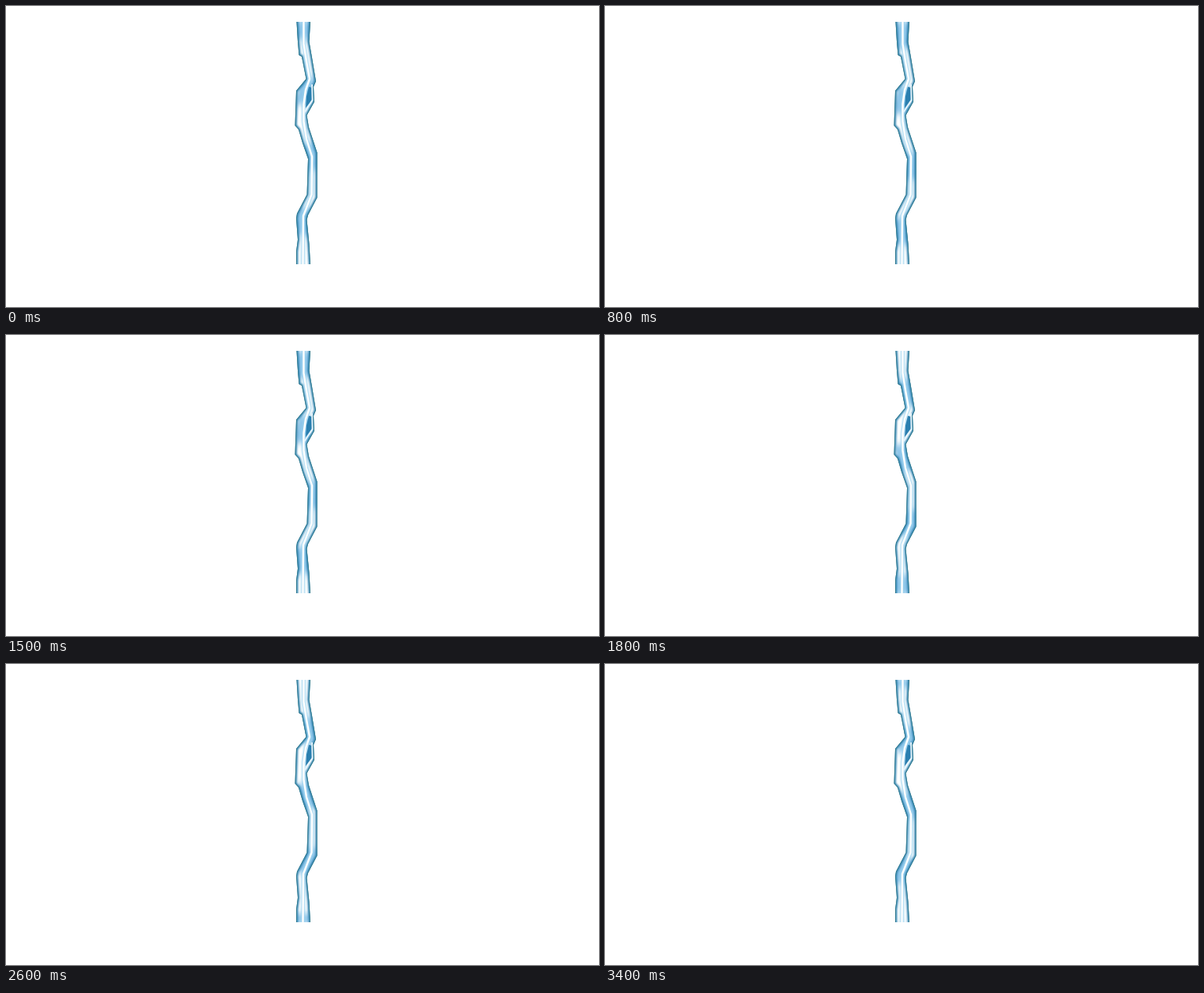
Write an HTML page that moves like this. It is 748 px wide and 380 px high and loops after 3.5 s.

```html
<!DOCTYPE html>
<html lang="en">
<head>
<meta charset="utf-8">
<title>Energy bolt</title>
<style>
  html, body { margin: 0; width: 100%; height: 100%; overflow: hidden; background: #fff; }
  svg { display: block; width: 748px; height: 380px; }
  path { fill: none; stroke-linejoin: round; }
  .body { fill: #46a8da; }
  .shade { stroke: #2b7fae; stroke-width: 4.5; }
  .rim { stroke: #3a7f8c; stroke-width: 1.6; }
  .flow {
    stroke: #2e95d8;
    stroke-width: 17;
    stroke-dasharray: 34 50;
    opacity: .55;
    animation: flow 700ms steps(7) infinite;
  }
  .halo { stroke: #9bd2ee; stroke-width: 4.6; }
  .core { stroke: #fff; stroke-width: 2.4; }
  .gap { fill: #2a7fb0; }
  .branch { stroke: #e6f5fc; stroke-width: 1.8; }
  /* one dash period downstream per cycle */
  @keyframes flow { from { stroke-dashoffset: 10; } to { stroke-dashoffset: -74; } }
</style>
</head>
<body>
<svg viewBox="0 0 748 380">
  <defs>
    <path id="shape" d="M366.5 20L368 45 369.5 62 373 64 378.5 92 366 107 364.5 151 369 156 374 173 381 193 379.5 238 367 262 366 268 368 295 366 310V326H384L382.5 300 379.5 270 381 264 392.5 242V185L382 153 379.5 138 389 121 388 102 391 95 386 65 382.5 45 384 20Z"/>
    <path id="sides" d="M366.5 18V20L368 45 369.5 62 373 64 378.5 92 366 107 364.5 151 369 156 374 173 381 193 379.5 238 367 262 366 268 368 295 366 310V328M384 328V326L382.5 300 379.5 270 381 264 392.5 242V185L382 153 379.5 138 389 121 388 102 391 95 386 65 382.5 45 384 18"/>
    <path id="spine" d="M375.5 18V48L379 70 383 92 378 106 375.5 124V146L379 168 386 190 385.5 238 375 265 374.5 328"/>
    <clipPath id="inside"><use href="#shape"/></clipPath>
    <filter id="soft" filterUnits="userSpaceOnUse" x="340" y="0" width="80" height="350">
      <feGaussianBlur stdDeviation="1 4"/>
    </filter>
    <filter id="fine" filterUnits="userSpaceOnUse" x="340" y="0" width="80" height="350">
      <feGaussianBlur stdDeviation=".8"/>
    </filter>
  </defs>
  <g clip-path="url(#inside)">
    <use href="#shape" class="body"/>
    <g filter="url(#soft)"><use href="#spine" class="flow"/></g>
    <use href="#sides" class="shade" filter="url(#fine)"/>
    <use href="#spine" class="halo" filter="url(#fine)"/>
    <path class="gap" d="M382 102L386 103V118L378 129 379 114Z"/>
    <use href="#spine" class="core"/>
    <path class="branch" d="M386 99L386.5 119 376.5 134"/>
    <use href="#sides" class="rim"/>
  </g>
</svg>
</body>
</html>
```
